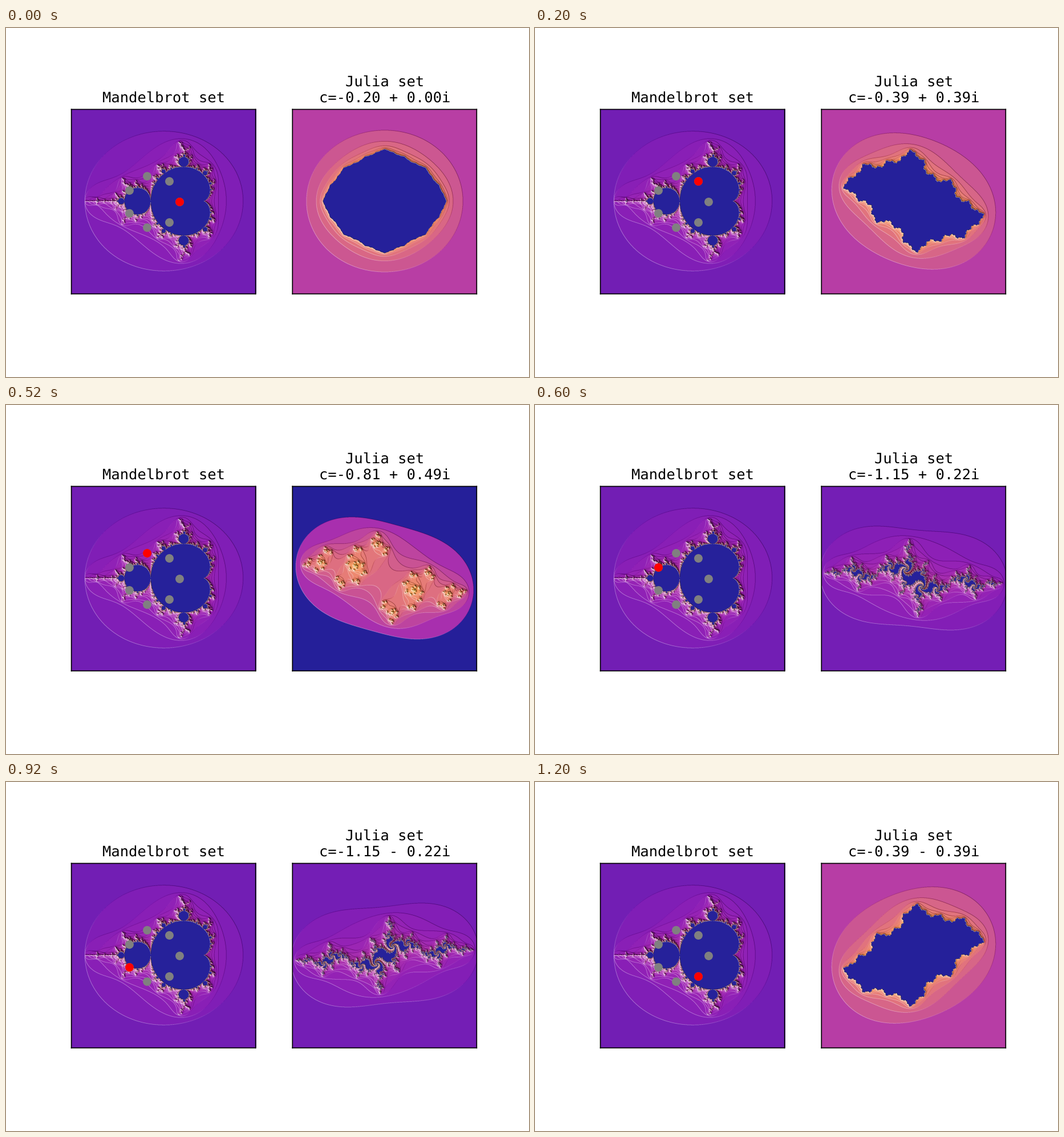
A matplotlib script for the animation above (1.4 s loop, 917 by 611 pixels).

```python
import numpy as np
import matplotlib.pyplot as plt
from matplotlib.animation import FuncAnimation
from matplotlib.colors import LightSource, PowerNorm

WIDTH, HEIGHT, DPI = 917, 611, 152.8
FRAMES, INTERVAL = 7, 200
GRID, MAX_ITER, ESCAPE = 1000, 400, 2.0
MANDELBROT_EXTENT = (-2.25, 1.25, -1.75, 1.75)
JULIA_EXTENT = (-1.75, 1.75, -1.75, 1.75)

plt.rcParams["font.family"] = "DejaVu Sans Mono"
plt.rcParams["text.hinting"] = "none"
light = LightSource(azdeg=315, altdeg=10)


def plane(extent):
    x0, x1, y0, y1 = extent
    x = np.linspace(x0, x1, GRID)
    y = np.linspace(y0, y1, GRID)
    return x[None, :] + 1j * y[:, None]


def escape_counts(start, c):
    """Steps until |z| reaches the escape radius; 0 for points that stay."""
    z = start.ravel().copy()
    c = np.broadcast_to(c, start.shape).ravel()
    counts = np.zeros(z.size)
    alive = np.arange(z.size)
    for step in range(1, MAX_ITER):
        z = z * z + c
        out = z.real ** 2 + z.imag ** 2 >= ESCAPE ** 2
        counts[alive[out]] = step
        z, c, alive = z[~out], c[~out], alive[~out]
    return counts.reshape(start.shape)


def shade(counts):
    return light.shade(counts, cmap=plt.cm.plasma, vert_exag=1.5,
                       norm=PowerNorm(0.3), blend_mode="hsv")


def show_panel(ax, image, extent):
    ax.set(xticks=[], yticks=[])
    for spine in ax.spines.values():
        spine.set_snap(False)
    return ax.imshow(image, extent=extent, origin="lower")


points = -0.7 + 0.5 * np.exp(2j * np.pi * np.arange(FRAMES) / FRAMES)
julia_grid = plane(JULIA_EXTENT)
julia_images = [shade(escape_counts(julia_grid, c)) for c in points]
mandelbrot_grid = plane(MANDELBROT_EXTENT)
mandelbrot_image = shade(escape_counts(mandelbrot_grid, mandelbrot_grid))

fig, (map_ax, julia_ax) = plt.subplots(
    1, 2, figsize=(WIDTH / DPI, HEIGHT / DPI), dpi=DPI,
    gridspec_kw=dict(left=0.125, right=0.9, bottom=0.125, top=0.88, wspace=0.2))
show_panel(map_ax, mandelbrot_image, MANDELBROT_EXTENT)
julia_picture = show_panel(julia_ax, julia_images[0], JULIA_EXTENT)
map_ax.set_title("Mandelbrot set")
title = julia_ax.set_title("")
map_ax.plot(points.real, points.imag, "o", color="gray", snap=False)
marker, = map_ax.plot([], [], "o", color="red", snap=False)
map_ax.set(xlim=MANDELBROT_EXTENT[:2], ylim=MANDELBROT_EXTENT[2:])


def update(frame):
    c = points[frame]
    sign = "-" if c.imag < 0 else "+"
    title.set_text(f"Julia set\nc={c.real:.2f} {sign} {abs(c.imag):.2f}i")
    marker.set_data([c.real], [c.imag])
    julia_picture.set_data(julia_images[frame])
    return title, marker, julia_picture


animation = FuncAnimation(fig, update, frames=FRAMES, interval=INTERVAL,
                          repeat=True, repeat_delay=0)
plt.show()
```
